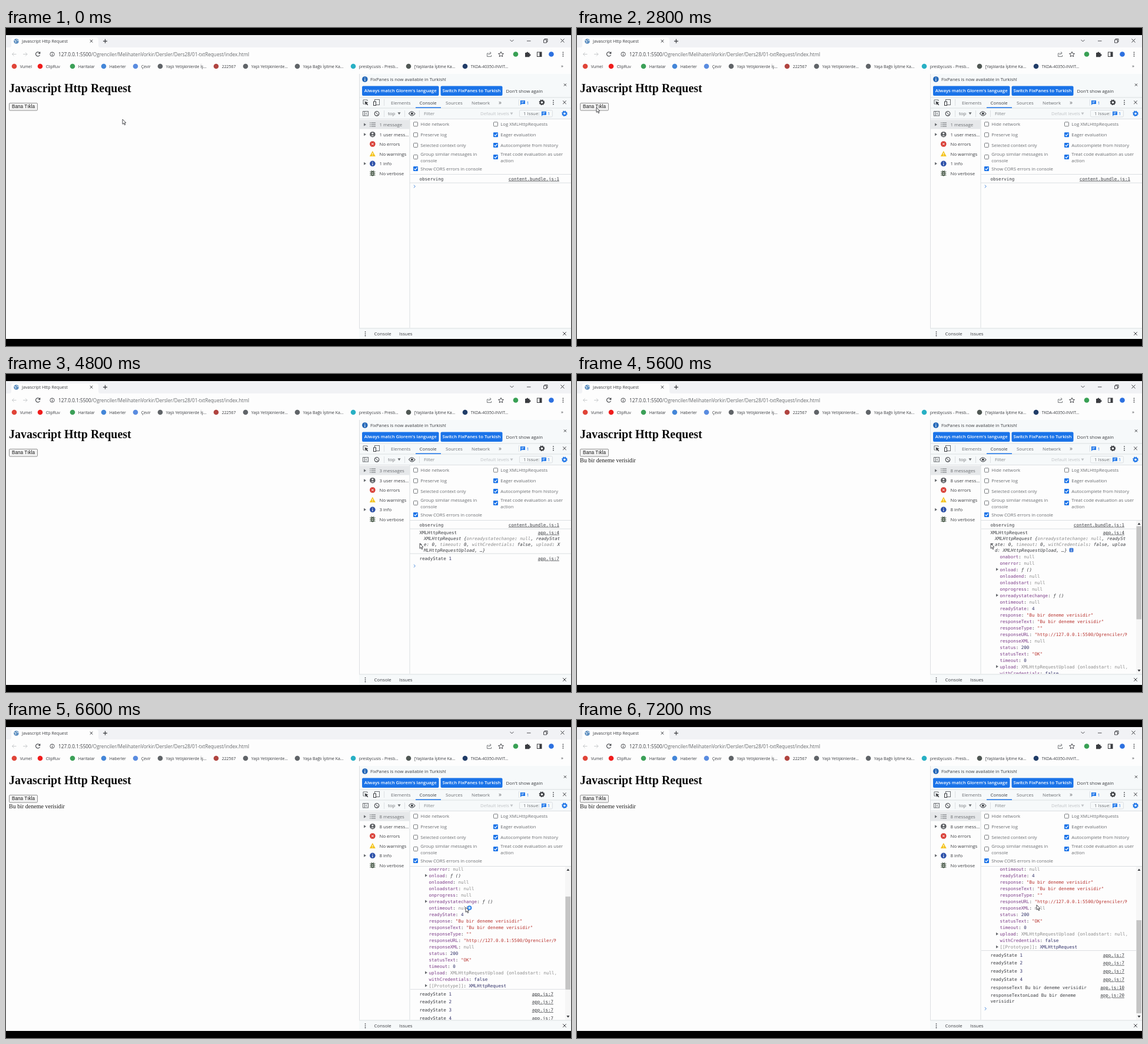
An HTML page for the animation above (8000 ms loop, 960 by 540 pixels).

```html
<!DOCTYPE html>
<html lang="tr">
<head>
<meta charset="utf-8">
<title>Javascript Http Request</title>
<style>
@property --s { syntax: '<number>'; inherits: true; initial-value: 0; }
html, body { margin: 0; width: 100%; height: 100%; overflow: hidden; background: #000; }
svg { display: block; width: 960px; height: 540px; }
text { font-family: 'Open Sans', 'Noto Sans', sans-serif; }
.serif { font-family: 'Liberation Serif', 'Times New Roman', serif; }
.sans { font-family: 'Liberation Sans', Arial, sans-serif; }
.mono { font-family: 'DejaVu Sans Mono', 'Noto Sans Mono', monospace; }
.it { font-style: italic; }
.link { text-decoration: underline; text-anchor: end; }
.k { fill: #7c3c88; } .n { fill: #8c8c8c; } .q { fill: #b83430; } .v { fill: #303068; }

/* one 8 s loop: before the click, waiting, answered, object opened */
.idle, .wait, .done, .shut, .open, .after, .busy { visibility: hidden; animation: 8s step-end infinite; }
.idle { animation-name: idle; } .wait { animation-name: wait; } .done { animation-name: done; }
.shut { animation-name: shut; } .open { animation-name: open; }
.after { animation-name: after; } .busy { animation-name: busy; }
@keyframes idle { 0% { visibility: visible } 36.625%, 100% { visibility: hidden } }
@keyframes wait { 0% { visibility: hidden } 36.625% { visibility: visible } 62.5%, 100% { visibility: hidden } }
@keyframes done { 0% { visibility: hidden } 62.5%, 100% { visibility: visible } }
@keyframes shut { 0% { visibility: visible } 70%, 100% { visibility: hidden } }
@keyframes open { 0% { visibility: hidden } 70%, 100% { visibility: visible } }
@keyframes after { 0% { visibility: hidden } 62.5% { visibility: visible } 70%, 100% { visibility: hidden } }
@keyframes busy { 0% { visibility: hidden } 82.5% { visibility: visible } 86%, 100% { visibility: hidden } }

#view { animation: scroll 8s linear infinite; }
#roll { transform: translateY(calc(var(--s) * -1px)); }
#thumb { transform: translateY(calc(var(--s) * .61px)); }
@keyframes scroll {
  0%, 73% { --s: 0 } 75.5%, 81% { --s: 15 } 84%, 85% { --s: 119.5 } 88%, 100% { --s: 133.5 }
}

#cursor { animation: point 8s linear infinite; }
@keyframes point {
  0%, .8% { transform: translate(198px, 155px) }
  4.125%, 6.6% { transform: translate(200px, 241px) }
  6.625%, 15.2% { transform: translate(378px, 243px) }
  22.5%, 23.3% { transform: translate(310px, 220px) }
  27.5%, 32.4% { transform: translate(110px, 166px) }
  35%, 37% { transform: translate(33px, 135px) }
  42.5%, 43.3% { transform: translate(602px, 256px) }
  44.1%, 45.8% { transform: translate(752px, 260px) }
  53.4%, 55.8% { transform: translate(712px, 276px) }
  56.6%, 70% { transform: translate(703px, 288px) }
  75%, 80% { transform: translate(705px, 289px) }
  82.5%, 85% { transform: translate(781px, 318px) }
  87%, 100% { transform: translate(781px, 314px) }
}
</style>
</head>
<body>
<svg id="stage" viewBox="0 0 960 540" xmlns="http://www.w3.org/2000/svg"></svg>
<script>
const INK = '#3a3c40', SOFT = '#696c70', LINE = '#dcdfe2', BLUE = '#1a73e8';
const PAGE = '#fdfdfd', BAR = '#f6f9fa';

// y is the middle of the line of text
const text = (x, y, str, size = 7.8, fill = INK, attrs = '') =>
  `<text x="${x}" y="${(y + size * .36).toFixed(2)}" font-size="${size}" fill="${fill}" ${attrs}>${str}</text>`;
const mono = (x, y, str, cls = '') => text(x, y, str, 7.54, INK, `class="mono ${cls}"`);
const rect = (x, y, w, h, fill, attrs = '') =>
  `<rect x="${x}" y="${y}" width="${w}" height="${h}" fill="${fill}" ${attrs}/>`;
const dot = (x, y, r, fill, attrs = '') => `<circle cx="${x}" cy="${y}" r="${r}" fill="${fill}" ${attrs}/>`;
const path = (d, stroke = INK, width = 1, fill = 'none') =>
  `<path d="${d}" stroke="${stroke}" stroke-width="${width}" fill="${fill}"/>`;
const group = (cls, ...parts) => `<g class="${cls}">${parts.join('')}</g>`;
const cross = (x, y, r = 2.8, c = INK) => path(`M${x - r} ${y - r}l${2 * r} ${2 * r}m0 ${-2 * r}l${-2 * r} ${2 * r}`, c);
const dots = (x, y) => [-3.2, 0, 3.2].map(d => dot(x, y + d, .9, INK)).join('');
const right = (x, y) => path(`M${x} ${y - 2.5}l4 2.5l-4 2.5z`, 'none', 0, SOFT);
const down = (x, y) => path(`M${x} ${y - 1.5}h5l-2.5 4z`, 'none', 0, SOFT);
const prompt = y => path(`M692.8 ${y - 2.4}l2.6 2.4l-2.6 2.4`, '#4c8cdc', 1);
const rule = (y, x = 600) => rect(x, y, 960 - x, 1, LINE);
const gear = (x, y, c) => dot(x, y, 2.9, 'none', `stroke="${c}" stroke-width="2"`) +
  dot(x, y, 4.2, 'none', `stroke="${c}" stroke-width="1.3" stroke-dasharray="1.65"`);
const bubble = (x, y) => path(`M${x - 4} ${y - 3.5}h8v6h-6l-2 2z`, 'none', 0, BLUE) +
  path(`M${x - 2.4} ${y - 1.6}h4.8m-4.8 2h3.4`, '#fff', .8);

function check(x, y, label, on, second) {
  const box = on
    ? rect(x - 4, y - 4, 8, 8, BLUE, 'rx="1"') + path(`M${x - 2.4} ${y}l1.8 1.8l3.2-3.8`, '#fff', 1.2)
    : rect(x - 3.5, y - 3.5, 7, 7, '#fff', `rx="1" stroke="${SOFT}" stroke-width=".9"`);
  return box + text(x + 8.3, second ? y - 5 : y + .3, label, 7.8, SOFT) +
    (second ? text(x + 8.3, y + 6, second, 7.8, SOFT) : '');
}

function browser() {
  const marks = [
    [14, '#e04438', 'Vumel'], [58, '#f01c1c', 'ClipRuv'], [113, '#3ca058', 'Haritalar'],
    [166, '#4486d8', 'Haberler'], [220, '#5a8ce0', 'Çevir'], [262, '#606468', 'Yaşlı Yetişkinlerde İş...'],
    [357, '#b04440', '222567'], [407, '#606468', 'Yaşlı Yetişkinlerde...'],
    [495, '#606468', 'Yaşa Bağlı İşitme Ka...'], [590, '#28b0c4', 'presbycusis - Presb...'],
    [684, '#505854', '[Yaşlılarda İşitme Ka...'], [780, '#203c68', 'TKDA-40350-INVIT...']
  ];
  return rect(0, 12, 960, 516, PAGE) + rect(0, 12, 960, 21, '#f1f2f5') +
    path('M6 33q3 0 3-4v-9q0-4 4-4h140q4 0 4 4v9q0 4 3 4z', 'none', 0, PAGE) +
    dot(17.5, 22.5, 4.3, '#5c8ec0') + path('M14 21l3 1l-1 3m2-6l1 2l3 1', '#e8f0f4', 1) +
    text(27, 22.3, 'Javascript Http Request', 7.2) + cross(145, 22.3, 2.3) +
    path('M165 22.3h7m-3.5-3.5v7', INK, 1.2) +
    path('M856.5 20l3 3l3-3M885 22h6.5M913.5 20h5v5h-5zm1.5 0v-1.5h5v5h-1.5', INK, .9) + cross(945.5, 21.5, 3) +
    path('M17.5 44.5h-7m3-3l-3 3l3 3M29 44.5h7m-3-3l3 3l-3 3', '#c8cacc', 1) +
    path('M57.3 42.6a3.6 3.6 0 1 0 .2 3M57.8 40.4v2.7h-2.7', INK, 1.1) +
    dot(78.5, 44.5, 3.6, 'none', `stroke="${INK}" stroke-width=".9"`) + path('M78.5 42v1m0 1v2.8', INK) +
    text(89, 44.7, '127.0.0.1:5500<tspan fill="#66696c">/Ogrenciler/MelihatenVorkir/Dersler/Ders28/01-txtRequest/index.html</tspan>', 8.22) +
    path('M820 43h-2.5v5.5h7V46M820 46q0-3.5 4-3.5m-2-2l2.2 2l-2.2 2', SOFT, .9) +
    path('M841 40.3l1.3 2.9l3.2.3l-2.4 2.1l.7 3.1l-2.8-1.7l-2.8 1.7l.7-3.1l-2.4-2.1l3.2-.3z', INK, .9) +
    dot(866, 44.5, 4.3, '#38a054') +
    path('M882 42h2.3a1.5 1.5 0 1 1 3 0h2.2v2.4a1.5 1.5 0 1 1 0 2.8v2h-7.5z', 'none', 0, INK) +
    rect(902.5, 41, 7.5, 7.5, 'none', `stroke="${INK}"`) + rect(906.5, 41, 3.5, 7.5, INK) +
    dot(926.5, 44.5, 4.3, '#2c70e0') + dots(946.5, 44.5) +
    marks.map(([x, c, s]) => dot(x, 65, 4.3, c) + text(x + 9.7, 65.2, s, 6.9)).join('') +
    text(943, 64.5, '»', 8) +
    text(5, 102, 'Javascript Http Request', 20, '#0c0c0c', 'class="serif" font-weight="700"') +
    rect(5.5, 127.5, 48, 12.5, '#f4f4f4', 'rx="1.5" stroke="#858585" stroke-width=".9"') +
    text(10, 133.3, 'Bana Tıkla', 8.2, '#1c1c1c', 'class="sans"') +
    group('done', text(5, 146, 'Bu bir deneme verisidir', 10.03, '#1c1c1c', 'class="serif"'));
}

function toolbars() {
  return rect(600, 78, 360, 77, BAR) + rect(600, 78, 1, 450, LINE) +
    dot(609.8, 87, 4.8, '#2468b8') + path('M609.8 84.2v1.2m0 1v3.6', '#fff', 1.1) +
    text(619, 87.3, 'FixPanes is now available in Turkish!', 7.71) + cross(950, 96.5, 2) +
    rect(605, 98.5, 130.5, 16.5, BLUE, 'rx="2"') + rect(738.5, 98.5, 105, 16.5, BLUE, 'rx="2"') +
    text(670.2, 106.7, 'Always match Glorem\'s language', 7.75, '#fff', 'text-anchor="middle" font-weight="600"') +
    text(791, 106.7, 'Switch FixPanes to Turkish', 7.75, '#fff', 'text-anchor="middle" font-weight="600"') +
    text(849.5, 106.7, "Don't show again", 7.8) + rule(117.5) +
    path('M614 124v-2h-7v7h2.5', SOFT) + path('M609.5 124.5l6 2.3l-2.5 1l2.3 2.5l-1 1l-2.5-2.4l-1 2z', 'none', 0, INK) +
    rect(626.5, 121.5, 8, 9, 'none', `stroke="${SOFT}"`) + rect(624.5, 125, 4, 6.5, BAR, `stroke="${INK}"`) +
    rect(642, 121, 1, 11, LINE) +
    text(654, 126.8, 'Elements', 7.8, SOFT) + text(702.5, 126.8, 'Console', 7.8) +
    text(747, 126.8, 'Sources', 7.8, SOFT) + text(791, 126.8, 'Network', 7.8, SOFT) + text(837, 126, '»', 10, SOFT) +
    rect(871, 121, 1, 11, LINE) + bubble(878, 126.5) + text(884.5, 126.8, '1', 7.5, BLUE) +
    gear(910.5, 126.3, INK) + dots(930, 126.3) + cross(949, 126.3) +
    rule(135.5) + rect(696, 134.5, 43, 1.5, BLUE) +
    rect(606.5, 141.5, 9, 7.5, 'none', `stroke="${SOFT}"`) + path('M609.5 141.5v7.5m4-5.5l-2 1.8l2 1.8', SOFT) +
    dot(630, 145.3, 3.8, 'none', `stroke="${INK}" stroke-width="1.1"`) + path('M627.5 142.7l5 5.2', INK) +
    rect(642, 140, 1, 11, LINE) + text(649, 145.4, 'top', 7.8, SOFT) + down(665.5, 144.8) + rect(677, 140, 1, 11, LINE) +
    path('M684.5 145.3q5-7 10.5 0q-5 7-10.5 0z', SOFT, 1.2) + dot(689.8, 145.3, 1.9, INK) +
    rect(702, 140, 1, 11, LINE) + text(710, 145.6, 'Filter', 7.8, '#808488') +
    text(806, 145.3, 'Default levels', 7.8, '#c0c3c6') + path('M856.5 143.5h5l-2.5 4z', 'none', 0, '#c0c3c6') +
    rect(872.5, 139.5, 56, 11.5, 'none', `stroke="${LINE}" rx="2"`) +
    text(879, 145.4, '1 Issue:', 7.8, SOFT) + bubble(914, 145.3) + text(920, 145.4, '1', 7.5, BLUE) +
    gear(949, 145.3, BLUE) + rule(154);
}

function sidebar() {
  const rows = [164, 180.7, 197, 213.8, 230.3, 247];
  const count = (cls, n) => group(cls,
    text(634.5, rows[0], n + (n > 1 ? ' messages' : ' message'), 7.8, SOFT),
    text(634.5, rows[1], n + ' user mess...'), text(634.5, rows[4], n + ' info'));
  return rect(601, 156, 84.5, 15.5, '#e6e8ea') + rect(685.5, 155, 1, 354, LINE) +
    [0, 1, 4].map(i => right(608, rows[i])).join('') +
    path('M618 161h1.5m1 0h7.5M618 164h1.5m1 0h7.5M618 167h1.5m1 0h7.5', SOFT, 1.2) +
    dot(622.8, 180.7, 4.8, '#5a5c60') + dot(622.8, 179, 1.6, PAGE) + path('M620 183.6q2.8-3 5.6 0z', 'none', 0, PAGE) +
    dot(622.8, 197, 4.8, '#d83c34') + cross(622.8, 197, 1.9, '#fff') +
    path('M622.8 208.8l5 9.2h-10z', 'none', 0, '#f4c420') + path('M622.8 212v3m0 1v1', '#fff') +
    dot(622.8, 230.3, 4.8, '#2c50a8') + path('M622.8 227.6v1.2m0 1v3.4', '#fff', 1.1) +
    path('M618 244h9.6m-9.6 3h9.6m-9.6 3h9.6M620.5 241.5l1.5 2m3.2-2l-1.5 2', '#506050', .9) +
    rect(619.8, 242.8, 6, 8.8, '#506050', 'rx="3"') + path('M621.3 246h3m-3 2.6h3', PAGE, .9) +
    text(634.5, rows[2], 'No errors') + text(634.5, rows[3], 'No warnings') + text(634.5, rows[5], 'No verbose') +
    count('idle', 1) + count('wait', 3) + count('done', 8);
}

function settings() {
  return check(696, 163.3, 'Hide network') + check(696, 181.3, 'Preserve log') +
    check(696, 199, 'Selected context only') + check(696, 219, 'Group similar messages in', false, 'console') +
    check(696, 239, 'Show CORS errors in console', true) + check(832, 163.3, 'Log XMLHttpRequests') +
    check(832, 181.3, 'Eager evaluation', true) + check(832, 199, 'Autocomplete from history', true) +
    check(832, 219, 'Treat code evaluation as user', true, 'action') + rule(248, 686);
}

const tint = s => s.replace(/\bnull\b/g, '<tspan class="n">null</tspan>')
  .replace(/(onreadystatechange|timeout|withCredentials|upload):/g, '<tspan class="n">$1</tspan>:');

// the request object's summary, wrapped in three lines
const request = (y, edge, lines) => mono(702.5, y, 'XMLHttpRequest') + mono(edge, y, 'app.js:4', 'link') +
  lines.map((s, i) => mono(710, y + 10 * (i + 1), tint(s), 'it')).join('');

const observing = edge => mono(702.5, 256, 'observing') + mono(edge, 256, 'content.bundle.js:1', 'link') + rule(262.5, 686);
const state = (y, edge, n) => mono(702.5, y, `readyState <tspan class="v">${n}</tspan>`) + mono(edge, y, 'app.js:7', 'link');

// rows from the second ready state to the prompt
function answers(y, edge) {
  const at = i => y + 13.75 * i;
  return [1, 2, 3].map(i => state(at(i), edge, i + 1)).join('') +
    mono(702.5, at(4), 'responseText Bu bir deneme verisidir') + mono(edge, at(4), 'app.js:10', 'link') +
    mono(702.5, at(5), 'responseTextonLoad Bu bir deneme') + mono(702.5, at(5) + 10, 'verisidir') +
    mono(edge, at(5), 'app.js:20', 'link') + prompt(at(5) + 22.5);
}

const FIELDS = `onabort: null
onerror: null
>onload: ƒ ()
onloadend: null
onloadstart: null
onprogress: null
>onreadystatechange: ƒ ()
ontimeout: null
readyState: 4
response: "Bu bir deneme verisidir"
responseText: "Bu bir deneme verisidir"
responseType: ""
responseURL: "http://127.0.0.1:5500/Ogrenciler/MelihatenVorkir/"
responseXML: null
status: 200
statusText: "OK"
timeout: 0
>upload: XMLHttpRequestUpload {onloadstart: null, on
withCredentials: false
>[[Prototype]]: XMLHttpRequest`.split('\n');

function field(line, i) {
  const y = 309.8 + 11 * i, nested = line[0] === '>';
  const [, key, value] = line.match(/^>?(.+?): (.*)$/);
  const cls = value === 'null' || key === 'upload' ? 'n' : value[0] === '"' ? 'q' : value[0] === 'ƒ' ? 'it' : 'v';
  return (nested ? right(712, y) : '') +
    mono(718.5, y, `<tspan class="${key[0] === '[' ? 'n' : 'k'}">${key}</tspan>: <tspan class="${cls}">${value}</tspan>`);
}

function output() {
  const closed = ['XMLHttpRequest {onreadystatechange: null, readyStat',
    'e: 0, timeout: 0, withCredentials: false, upload: X', 'MLHttpRequestUpload, …}'];
  const opened = ['XMLHttpRequest {onreadystatechange: null, readySt',
    'ate: 0, timeout: 0, withCredentials: false, uploa', 'd: XMLHttpRequestUpload, …}'];
  const sent = request(269, 940, closed) + right(703, 289.5) + rule(304.5, 686) + state(313, 940, 1);
  return group('shut', observing(940)) + group('idle', prompt(269)) +
    group('wait', sent, prompt(326)) + group('after', sent, answers(313, 940)) +
    `<g class="open"><g id="view"><g clip-path="url(#pane)"><g id="roll">` +
    observing(930) + request(269, 930, opened) + down(702.5, 289) +
    rect(836.5, 295.5, 7, 7, '#3c78d8', 'rx="1.5"') + path('M840 297v1m0 .8v2.4', '#fff') +
    `<g clip-path="url(#tree)">${FIELDS.map(field).join('')}</g>` + rule(524.5, 686) +
    state(532.5, 930, 1) + answers(532.5, 930) +
    `</g></g>` + rect(950, 249, 10, 260, '#f6f6f6') +
    path('M952.5 256h5l-2.5-3.5zM952.5 502h5l-2.5 3.5z', 'none', 0, INK) +
    rect(950.5, 258.5, 8.5, 158, '#c4c4c4', 'id="thumb"') + '</g></g>';
}

const drawer = () => rect(600, 509.5, 360, 18.5, BAR) + rule(509.5) + dots(610.5, 519.3) +
  text(625.5, 519.5, 'Console') + text(668, 519.5, 'Issues') + cross(949, 519);

const cursor = () => `<g id="cursor">${path('M0 0v8.3l2-1.8l1.4 3.2l1.4-.6l-1.4-3.1h2.5z', INK, .9, '#fff')}` +
  group('busy', dot(6.5, 1, 3, '#b8e0f4', `stroke="${BLUE}" stroke-width="1.6"`)) + '</g>';

document.getElementById('stage').innerHTML =
  '<clipPath id="pane"><rect x="687" y="249.5" width="263" height="259.5"/></clipPath>' +
  '<clipPath id="tree"><rect x="700" y="290" width="234.5" height="260"/></clipPath>' +
  browser() + toolbars() + sidebar() + settings() + output() + drawer() +
  rect(0, 528, 960, 12, '#000') + cursor();
</script>
</body>
</html>
```
